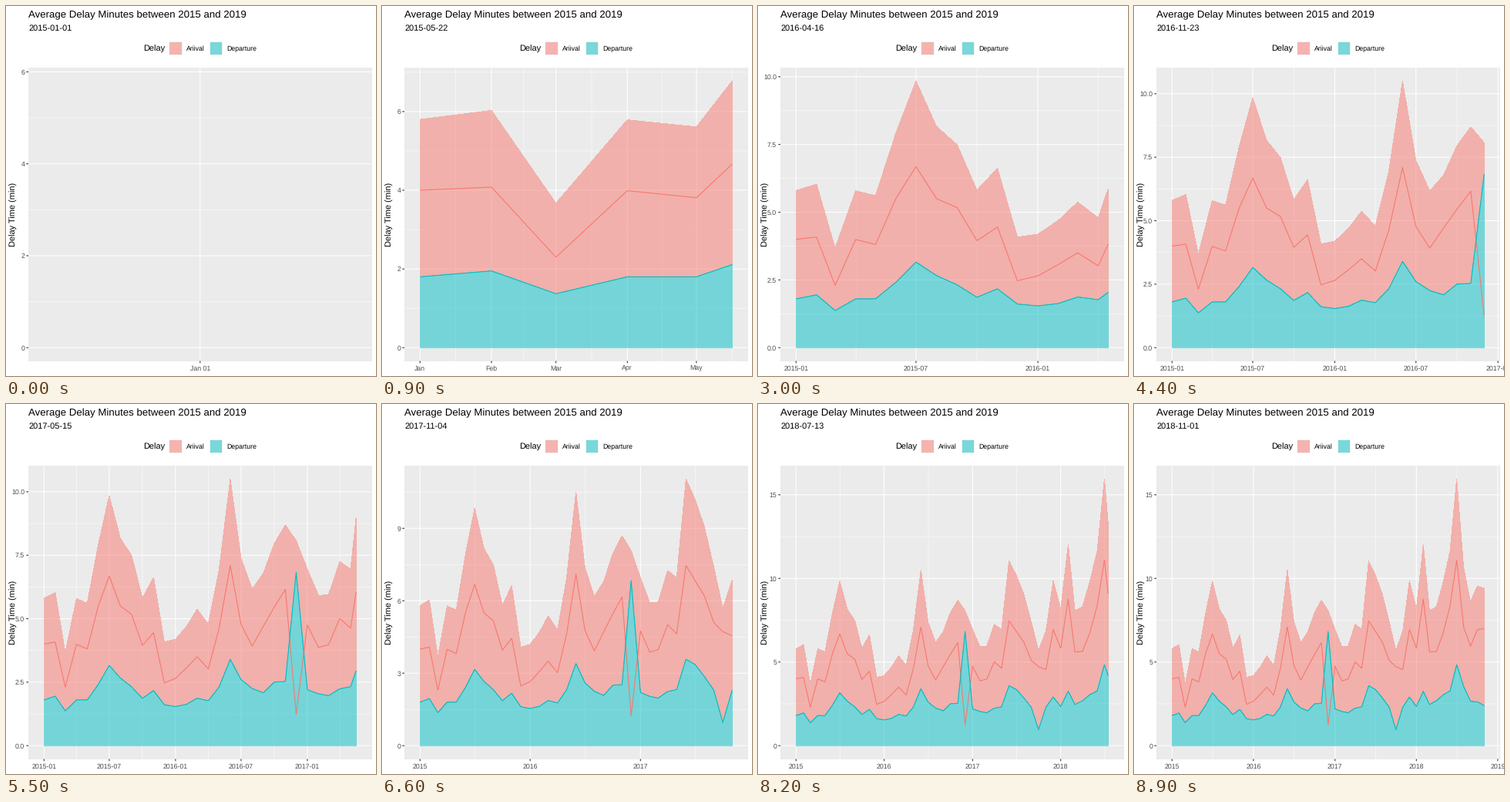
Recreate the animation shown at these times as a matplotlib script. Size 480 px wide and 480 px high, loop 10000 ms.

```python
import math
import matplotlib
import matplotlib.pyplot as plt
import numpy as np
from matplotlib.animation import FuncAnimation
from matplotlib.patches import Rectangle

matplotlib.rcParams["font.family"] = "Liberation Sans"
matplotlib.rcParams["text.hinting"] = "none"

SIZE = 480
FRAMES, LAST = 100, 89          # reveal ends at LAST, then holds
LEFT, RIGHT, TOP, BOTTOM = 29.1, 474.5, 80.1, 460.5
RED, TEAL = "#F8766D", "#00BFC4"
LINE = 1.07

ARRIVAL = np.array([
    4.00, 4.08, 2.30, 3.99, 3.81, 5.52, 6.68, 5.50, 5.17, 3.95, 4.45, 2.47,
    2.65, 3.07, 3.50, 3.02, 4.62, 7.10, 4.77, 3.92, 4.71, 5.45, 6.16, 1.24,
    4.75, 3.87, 3.98, 5.01, 4.63, 7.46, 6.84, 6.20, 5.10, 4.72, 4.55, 6.94,
    5.83, 8.76, 5.60, 5.63, 6.72, 8.36, 11.10, 7.08, 5.94, 6.92, 7.01])
DEPARTURE = np.array([
    1.80, 1.95, 1.37, 1.80, 1.80, 2.42, 3.16, 2.66, 2.32, 1.86, 2.17, 1.61,
    1.54, 1.63, 1.87, 1.77, 2.31, 3.40, 2.60, 2.25, 2.08, 2.50, 2.53, 6.83,
    2.20, 2.04, 1.97, 2.24, 2.32, 3.58, 3.36, 2.86, 2.30, 0.96, 2.30, 2.91,
    2.34, 3.25, 2.46, 2.68, 3.04, 3.27, 4.84, 3.54, 2.65, 2.62, 2.40])

START = np.datetime64("2015-01-01")


def month_days(step=1, day=1):
    """Day offsets of every step-th month from 2013 to 2020."""
    months = np.arange("2013-01", "2021-01", step, dtype="datetime64[M]")
    return (months.astype("datetime64[D]") - START).astype(int) + day - 1


def date_text(day, fmt):
    return (START + np.timedelta64(int(day), "D")).astype(object).strftime(fmt)


MONTHS = month_days()
DAYS = MONTHS[24:24 + len(ARRIVAL)]
SPAN = int(DAYS[-1])
KNOTS = np.round(DAYS * LAST / SPAN)

# length in days, possible breaks, label format
DATE_STEPS = [
    (7, np.arange(-73, 2000, 7), "%b %d"),
    (365.25 / 24, np.sort(np.r_[MONTHS, month_days(day=15)]), "%b %d"),
    (365.25 / 12, MONTHS, "%b"),
    (365.25 / 4, month_days(3), "%b"),
    (365.25 / 2, month_days(6), "%Y-%m"),
    (365.25, month_days(12), "%Y"),
]


def date_breaks(lo, hi, n=5):
    def cover(step):
        at = step[1]
        return at[np.sum(at <= lo) - 1:len(at) - np.sum(at >= hi) + 1]

    i = int(np.argmin([abs((hi - lo) / s[0] - n) for s in DATE_STEPS]))
    at = cover(DATE_STEPS[i])
    count = len(at) - 1
    j = i + (1 if count > n else -1)
    if count != n and 0 <= j < len(DATE_STEPS):
        other = cover(DATE_STEPS[j])
        if abs(len(other) - 1 - n) < abs(count - n):
            i, at = j, other
    return at, DATE_STEPS[i][2]


def value_breaks(lo, hi, m=5):
    """Extended Wilkinson labelling by plain search."""
    best, found = -2, None
    size = hi - lo
    nice = [1, 5, 2, 2.5, 4, 3]
    for j in (1, 2):
        for i, q in enumerate(nice):
            for k in range(2, 11):
                z0 = math.ceil(math.log10(size / (k + 1) / j / q))
                for z in (z0, z0 + 1):
                    step = j * q * 10.0 ** z
                    first = math.floor(hi / step) * j - (k - 1) * j
                    for s in range(first, math.ceil(lo / step) * j + 1):
                        a = s * step / j
                        b = a + step * (k - 1)
                        zero = s % j == 0 and a <= 0 <= b
                        simple = 1 - i / (len(nice) - 1) - j + zero
                        cover = 1 - 0.5 * ((hi - b) ** 2 + (lo - a) ** 2) / (0.1 * size) ** 2
                        r = (k - 1) / (b - a)
                        rt = (m - 1) / (max(b, hi) - min(a, lo))
                        dense = 2 - max(r / rt, rt / r)
                        score = 0.25 * simple + 0.2 * cover + 0.5 * dense + 0.05
                        if score > best:
                            best, found = score, (a, step, k)
    a, step, k = found
    return a + step * np.arange(-1, k + 1), a, a + step * (k - 1)


def midpoints(at):
    return (at[1:] + at[:-1]) / 2


def inside(at, lo, hi):
    return at[(at >= lo) & (at <= hi)]


fig = plt.figure(figsize=(SIZE / 72, SIZE / 72), dpi=72, facecolor="white")
ax = fig.add_axes([0, 0, 1, 1])
ax.set_xlim(0, SIZE)
ax.set_ylim(SIZE, 0)
ax.axis("off")


def text(x, y, s, size, color="black", **kw):
    kw.setdefault("va", "baseline")
    return ax.text(x, y, s, fontsize=size, color=color, zorder=9, **kw)


def box(x, y, w, h, color, **kw):
    ax.add_patch(Rectangle((x, y), w, h, facecolor=color, lw=0, zorder=0, **kw))


text(29.1, 15, "Average Delay Minutes between 2015 and 2019", 13.2)
subtitle = text(29.1, 32, "", 11)
text(13.4, 270.3, "Delay Time (min)", 11, rotation=90, ha="right", va="center",
     rotation_mode="default").set(ha="center", x=9.6)
text(178, 58.9, "Delay", 11)
for x, color, label in ((211.6, RED, "Ariival"), (263.9, TEAL, "Departure")):
    box(x, 46.3, 17.28, 17.28, "#F2F2F2", antialiased=False)
    box(x + 0.7, 47, 15.9, 15.9, color, alpha=0.5, antialiased=False)
    text(x + 22.8, 58.1, label, 8.8)
box(LEFT, TOP, RIGHT - LEFT, BOTTOM - TOP, "#EBEBEB", antialiased=False)

moving = []


def segments(xs, ys, color, width, z):
    line, = ax.plot(xs, ys, color=color, lw=width, zorder=z, snap=False,
                    solid_capstyle="butt", solid_joinstyle="round")
    moving.append(line)


def grid(xs, ys, width, z):
    for x in xs:
        segments([x, x], [TOP, BOTTOM], "white", width, z)
    for y in ys:
        segments([LEFT, RIGHT], [y, y], "white", width, z)


def area(x, low, high, color):
    moving.append(ax.fill_between(x, low, high, facecolor=color, alpha=0.5,
                                  lw=0, antialiased=False, zorder=3))


def draw(frame):
    while moving:
        moving.pop().remove()
    i = min(frame, LAST)
    subtitle.set_text(date_text(SPAN * i // LAST, "%Y-%m-%d"))

    # monthly points so far, plus the moving tip
    at = np.append(KNOTS[KNOTS < i], i)
    day, arr, dep = (np.interp(at, KNOTS, v) for v in (DAYS, ARRIVAL, DEPARTURE))
    total = arr + dep

    ylo, yhi = -0.05 * total.max(), 1.05 * total.max()
    if i:
        xlo, xhi = -0.05 * day[-1], 1.05 * day[-1]
        xall, fmt = date_breaks(xlo, xhi)
    else:
        xlo, xhi = -1, 1
        xall, fmt = np.array([0]), "%b %d"

    def px(v):
        return LEFT + (v - xlo) / (xhi - xlo) * (RIGHT - LEFT)

    def py(v):
        return BOTTOM - (v - ylo) / (yhi - ylo) * (BOTTOM - TOP)

    yall, ymin, ymax = value_breaks(ylo, yhi)
    xmajor = inside(xall, xlo, xhi)
    ymajor = inside(yall[1:-1], ylo, yhi)
    grid(px(inside(midpoints(xall), xlo, xhi)),
         py(inside(midpoints(yall), ylo, yhi)), LINE / 2, 1)
    grid(px(xmajor), py(ymajor), LINE, 2)

    if i:
        x = px(day)
        area(x, py(dep), py(total), RED)
        area(x, py(0 * dep), py(dep), TEAL)
        segments(x, py(arr), RED, LINE, 4)
        segments(x, py(dep), TEAL, LINE, 5)

    for v in xmajor:
        segments([px(v)] * 2, [BOTTOM, BOTTOM + 2.75], "#333333", LINE, 6)
        moving.append(text(px(v), 472.6, date_text(v, fmt), 8.8, "#4D4D4D", ha="center"))
    digits = 0 if np.allclose(ymajor, np.round(ymajor)) else 1
    for v in ymajor:
        segments([LEFT - 2.75, LEFT], [py(v)] * 2, "#333333", LINE, 6)
        moving.append(text(24.2, py(v) + 3.2, f"{abs(v):.{digits}f}", 8.8, "#4D4D4D", ha="right"))
    return moving


anim = FuncAnimation(fig, draw, frames=FRAMES, interval=100, init_func=lambda: [],
                     repeat=True, repeat_delay=0, blit=False)
plt.show()
```
